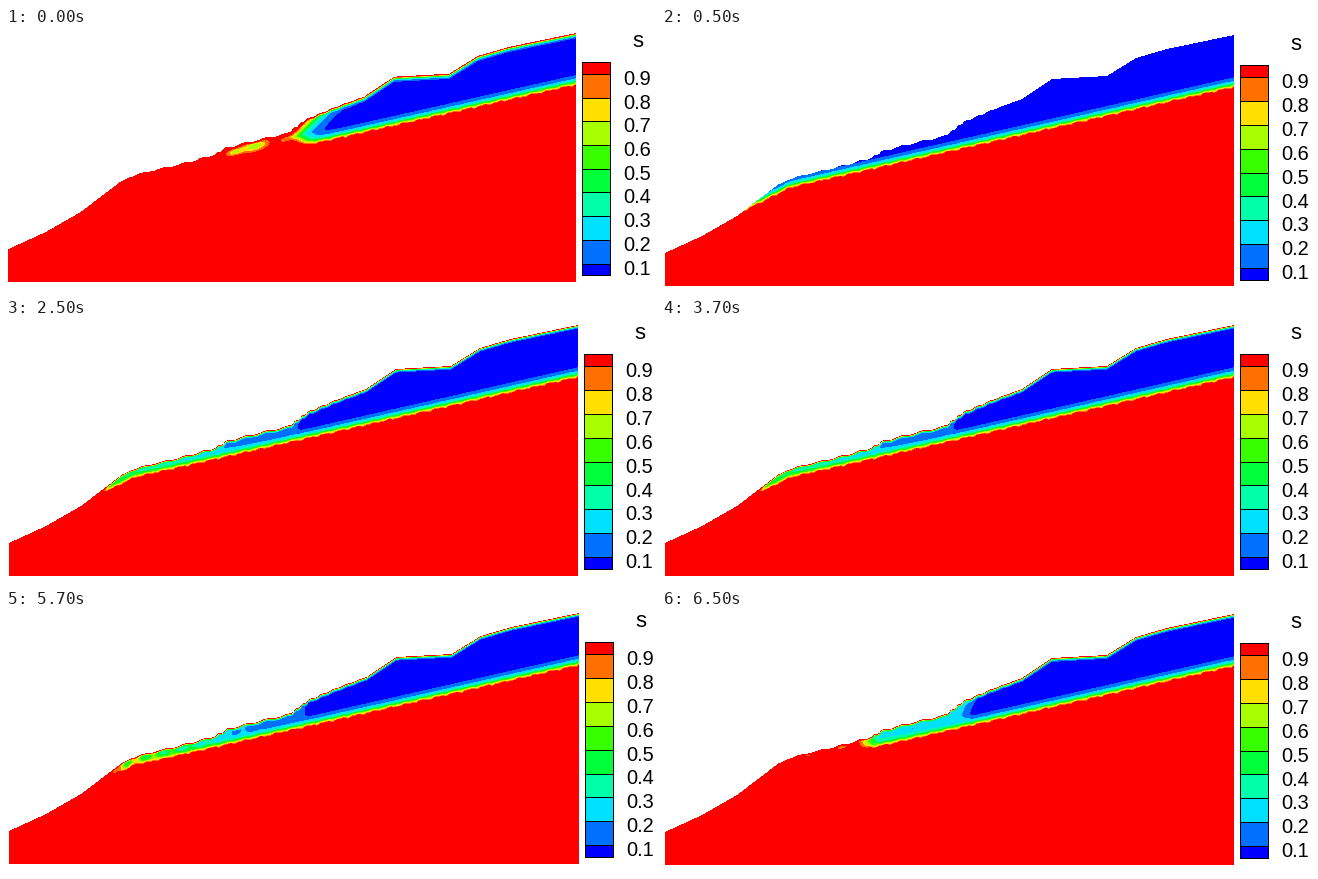
A matplotlib script that plays this animation: 650 px wide and 263 px high, repeating every 8 s.

```python
import matplotlib.pyplot as plt
import numpy as np
from matplotlib.animation import FuncAnimation
from matplotlib.colors import ListedColormap
from matplotlib.patches import Rectangle

W, H, DPI = 650, 263, 64
STEP_MS = 500
COLORS = ["#0000ff", "#0070ff", "#00e0ff", "#00ffa8", "#00ff38",
          "#38ff00", "#a8ff00", "#ffe000", "#ff7000", "#ff0000"]
LEVELS = np.arange(1, 10) / 10
TIP_LEVEL = .12

# Bends of the hillside; the small terraces are added by surface().
HILL = np.array([
    (3, 225), (40, 208), (75, 188), (117, 156), (134, 149), (174, 139.5),
    (193, 134.5), (210, 129.5), (221, 123), (246, 116.5), (283, 108),
    (302, 94), (330, 82), (360, 71), (390, 51), (445, 48), (474, 30),
    (505, 21), (572, 7)])

# steps: duration, box: left, top, width, height, bar: legend corner,
# soak: depth of the wet skin, front: start and length of the wet front,
# lean: how far the front bends back, plateau: level, bend and end of the
# damp layer behind it, spots: x, y, size and amount of drying.
SCENES = [
    dict(steps=1, box=(2, 5, 568, 249), bar=(576, 34), soak=2.2,
         front=(279, 16), lean=1.2, plateau=(0, 1, 290),
         spots=[(250, 121, 13, .38), (230, 127, 8, .3), (282, 114, 9, .14)]),
    dict(steps=4, box=(3, 7, 569, 251), bar=(578, 37), soak=.001,
         front=(0, 1), lean=0, plateau=(0, 1, 290), spots=[]),
    dict(steps=4, box=(3, 6, 569, 251), bar=(578, 35), soak=1.5,
         front=(93, 10), lean=0, plateau=(.42, 1.5, 291),
         spots=[(225, 124, 4, .1), (247, 120, 4, .1)]),
    dict(steps=4, box=(3, 3, 570, 251), bar=(579, 32), soak=1.5,
         front=(102, 11), lean=0, plateau=(.72, 2, 298), spots=[]),
    dict(steps=3, box=(3, 4, 569, 251), bar=(578, 33), soak=1.6,
         front=(187, 20), lean=.5, plateau=(.3, .3, 307),
         spots=[(147, 147, 6, .2), (180, 140, 5, .2), (107, 162, 4, .17),
                (250, 122, 4, .08)]),
]


def fade(distance, half):
    """Fall from 1 towards 0, passing one half at the given distance."""
    return 1 / (1 + (np.maximum(distance, 0) / half) ** 2.5)


def surface(x):
    y = np.interp(x, *HILL.T)
    terraced = np.exp(-((x - 235) / 105) ** 4)
    return y - .75 * terraced * np.sin(2 * np.pi * (y - 2) / 5)


def table(x):
    """Water table: a long gentle slope with a steeper foot."""
    return np.maximum(158.5 - .2265 * (x - 134), 180 - .5 * (x - 88))


def damp_layer(x, start, level, bend, tip):
    left = np.clip((tip - x) / (tip - start), 0, 1) ** bend
    excess = max(level - TIP_LEVEL, 0)
    patches = max(level - .5, 0) * np.sin(x * .35)
    plateau = (min(level, TIP_LEVEL) + (excess + patches) * left)
    return plateau * np.clip((tip - x) / 10 + .85, 0, 1)


def saturation(scene):
    """Saturation at every pixel centre, masked outside the slope."""
    left, top, width, height = scene["box"]
    px, py = np.meshgrid(np.arange(W) + .5, np.arange(H) + .5)
    x = 3 + (px - left) * 569 / width
    y = 7 + (py - top) * 251 / height
    depth = y - surface(x)
    rise = table(x) - y

    ripple = .7 * np.sin(x * .39) + .4 * np.sin(x * .83 + 1)
    jagged = rise + ripple * np.exp(-np.maximum(rise, 0) / 3)
    start, length = scene["front"]
    bent = x - scene["lean"] * np.abs(rise - 12)
    inner = np.maximum(fade(bent - start, length),
                       damp_layer(bent, start, *scene["plateau"]))
    for sx, sy, size, amount in scene["spots"]:
        dx, dy = x - sx, y - sy + .25 * (x - sx)
        inner -= amount * np.exp(-(dx ** 2 + (2.5 * dy) ** 2) / size ** 2)

    parts = fade(jagged + 2, 5), fade(depth, scene["soak"]), inner
    total = sum(np.maximum(part, 0) ** 3 for part in parts)
    outside = ((depth < 0) | (px < left) | (px > left + width)
               | (py > top + height))
    return np.ma.masked_where(outside, np.cbrt(total))


def label(x, y, text, size):
    return ax.text(x, y, text, fontsize=size * 72 / DPI, ha="center",
                   va="baseline", family="Liberation Sans", color="black")


def legend(left, top, scale):
    edges = top + scale * np.r_[0, 12 + 23.9 * np.arange(9), 215]
    parts = [label(left + 56, top - 15, "s", 22)]
    rows = np.round(edges) - .5
    for y0, y1, color in zip(rows, rows[1:], COLORS[::-1]):
        parts.append(ax.add_patch(Rectangle(
            (left - .5, y0), 28, y1 - y0, fc=color, ec="black",
            lw=72 / DPI, antialiased=False)))
    for y, level in zip(edges[1:], LEVELS[::-1]):
        parts.append(label(left + 55, y + 11, f"{level:.1f}", 20))
    return parts


def build(scene):
    s = saturation(scene)
    bands = np.ma.array(np.digitize(s.data, LEVELS), mask=s.mask)
    image = ax.imshow(bands, cmap=ListedColormap(COLORS), vmin=-.5, vmax=9.5,
                      extent=(0, W, H, 0), interpolation="nearest",
                      aspect="auto")
    return [image] + legend(*scene["bar"], scene["box"][3] / 251)


fig = plt.figure(figsize=(W / DPI, H / DPI), dpi=DPI, facecolor="white")
ax = fig.add_axes([0, 0, 1, 1])
ax.axis("off")
groups = [build(scene) for scene in SCENES]
ax.set_xlim(0, W)
ax.set_ylim(H, 0)
timeline = np.repeat(np.arange(len(SCENES)), [s["steps"] for s in SCENES])


def update(frame):
    for i, group in enumerate(groups):
        for artist in group:
            artist.set_visible(i == timeline[frame])
    return [artist for group in groups for artist in group]


anim = FuncAnimation(fig, update, frames=len(timeline), interval=STEP_MS,
                     repeat=True, repeat_delay=0, blit=False)
plt.show()
```
